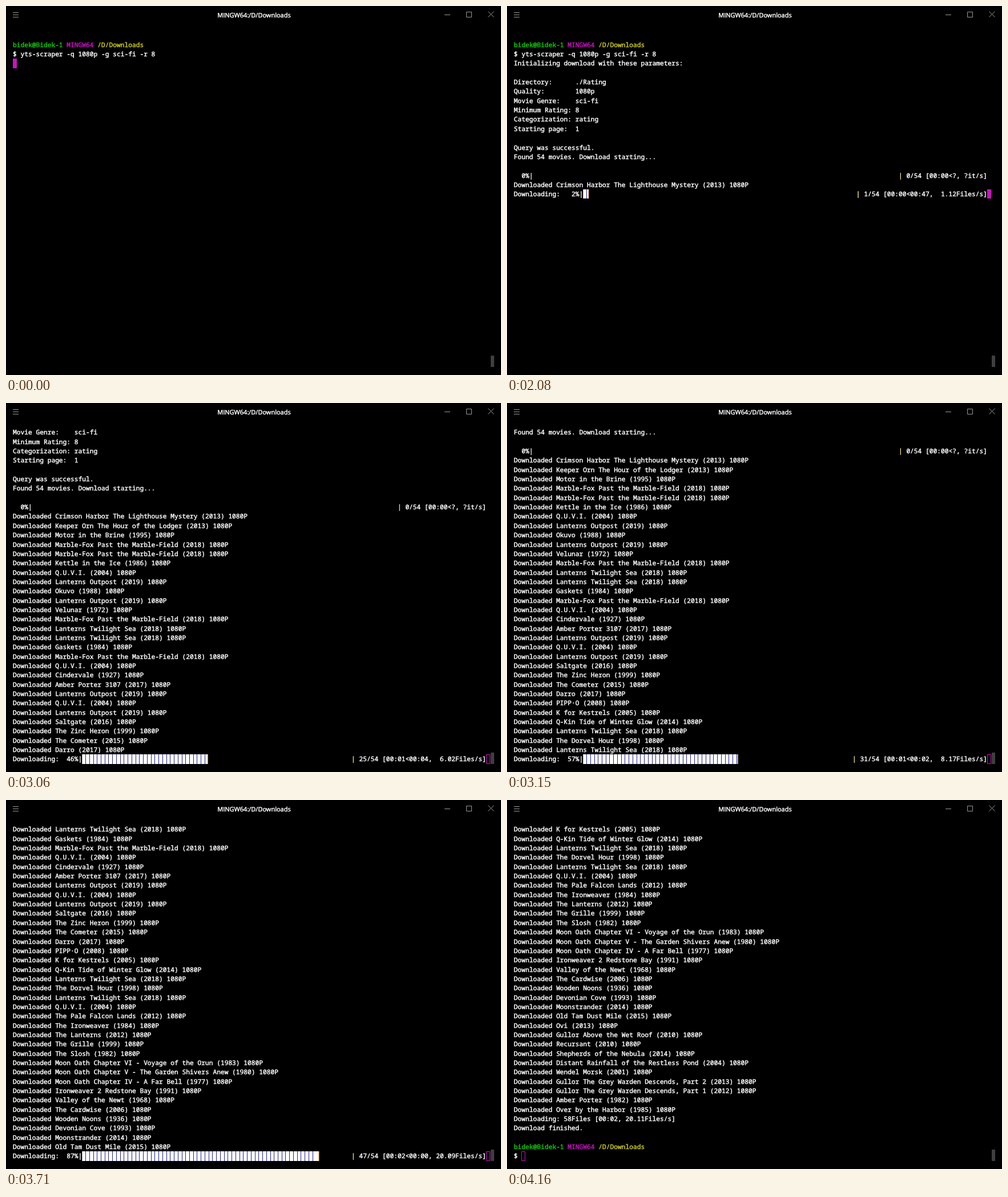
Animation, 867 px wide and 646 px high, one loop 4.81 s. Source, as an HTML page with a canvas:

```html
<!DOCTYPE html>
<html lang="en">
<head>
<meta charset="utf-8">
<title>Terminal download</title>
<style>
  html, body { margin: 0; width: 100%; height: 100%; overflow: hidden; background: #000; }
  canvas { display: block; }
</style>
</head>
<body>
<canvas id="stage" width="867" height="646"></canvas>
<script>
const ctx = document.getElementById('stage').getContext('2d', { alpha: false });
const LOOP = 4810, TOTAL = 54;
const COLS = 123, ROWS = 36, LEFT = 12, CELL_W = 6.739, CELL_H = 16.343;
const WHITE = '#fff', GREEN = '#16c60c', MAGENTA = '#c813c0', YELLOW = '#d0cf1c';
const PIPE = '#ffeb9c', SEAM = '#1d1d98', FRINGE = '#e8a840', CHROME = '#999';

const movies = `Crimson Harbor The Lighthouse Mystery (2013)
Keeper Orn The Hour of the Lodger (2013)
Motor in the Brine (1995)
Marble-Fox Past the Marble-Field (2018)
Marble-Fox Past the Marble-Field (2018)
Kettle in the Ice (1986)
Q.U.V.I. (2004)
Lanterns Outpost (2019)
Okuvo (1988)
Lanterns Outpost (2019)
Velunar (1972)
Marble-Fox Past the Marble-Field (2018)
Lanterns Twilight Sea (2018)
Lanterns Twilight Sea (2018)
Gaskets (1984)
Marble-Fox Past the Marble-Field (2018)
Q.U.V.I. (2004)
Cindervale (1927)
Amber Porter 3107 (2017)
Lanterns Outpost (2019)
Q.U.V.I. (2004)
Lanterns Outpost (2019)
Saltgate (2016)
The Zinc Heron (1999)
The Cometer (2015)
Darro (2017)
PIPP·O (2008)
K for Kestrels (2005)
Q-Kin Tide of Winter Glow (2014)
Lanterns Twilight Sea (2018)
The Dorvel Hour (1998)
Lanterns Twilight Sea (2018)
Q.U.V.I. (2004)
The Pale Falcon Lands (2012)
The Ironweaver (1984)
The Lanterns (2012)
The Grille (1999)
The Slosh (1982)
Moon Oath Chapter VI - Voyage of the Orun (1983)
Moon Oath Chapter V - The Garden Shivers Anew (1980)
Moon Oath Chapter IV - A Far Bell (1977)
Ironweaver 2 Redstone Bay (1991)
Valley of the Newt (1968)
The Cardwise (2006)
Wooden Noons (1936)
Devonian Cove (1993)
Moonstrander (2014)
Old Tam Dust Mile (2015)
Ovi (2013)
Gullor Above the Wet Roof (2010)
Recursant (2010)
Shepherds of the Nebula (2014)
Distant Rainfall of the Restless Pond (2004)
Wendel Morsk (2001)
Gullor The Grey Warden Descends, Part 2 (2013)
Gullor The Grey Warden Descends, Part 1 (2012)
Amber Porter (1982)
Over by the Harbor (1985)`.split('\n').map(title => `Downloaded ${title} 1080P`);

const prompt = [['bidek@Bidek-1 ', GREEN], ['MINGW64 ', MAGENTA], ['/D/Downloads', YELLOW]];
const command = ['', prompt, '$ yts-scraper -q 1080p -g sci-fi -r 8'];
const settings = `Initializing download with these parameters:

Directory:      ./Rating
Quality:        1080p
Movie Genre:    sci-fi
Minimum Rating: 8
Categorization: rating
Starting page:  1

Query was successful.
Found 54 movies. Download starting...
`.split('\n');

// time, lines listed, files counted, files per second
const progress = [
  [2080, 1, 1, 1.12], [2180, 4, 3, 1.36], [2230, 6, 5, 1.63], [2280, 9, 8, 2.02],
  [2560, 11, 10, 2.34], [2610, 13, 12, 2.71], [2650, 14, 13, 2.96], [2690, 16, 15, 3.42],
  [2740, 18, 17, 3.90], [2790, 20, 19, 4.36], [2820, 22, 21, 4.87],
  [3060, 26, 25, 6.02], [3100, 29, 28, 7.01], [3150, 32, 31, 8.17], [3200, 35, 34, 9.72],
  [3380, 37, 36, 10.9], [3430, 39, 38, 12.2], [3470, 41, 40, 13.7], [3510, 43, 42, 15.3],
  [3560, 45, 44, 17.1], [3710, 48, 47, 20.09], [3760, 51, 50, 20.10], [3800, 54, 53, 20.10],
  [3850, 56, 55, 20.10], [3890, 58, 58, 20.11]
];
const times = [0, 1210, 1770, ...progress.map(step => step[0]), 4070, 4160];

const clock = seconds => '00:' + String(Math.floor(seconds)).padStart(2, '0');

function meter(head, done, stats) {
  const tail = ` ${done}/${TOTAL} [${stats}]`;
  const width = COLS - head.length - tail.length - 1;
  const row = [[head + ' '.repeat(width), WHITE], ['|', PIPE], [tail, WHITE]];
  row.bar = { start: head.length, cells: width * done / TOTAL };
  return row;
}

function downloading(done, rate) {
  const speed = rate.toFixed(2).padStart(5) + 'Files/s';
  if (done > TOTAL) return `Downloading: ${done}Files [00:02, ${speed}]`;
  const percent = String(Math.round(100 * done / TOTAL)).padStart(3);
  const elapsed = done < 9 ? 0 : done < 36 ? 1 : 2;
  const stats = done ? `${clock(elapsed)}<${clock((TOTAL - done) / rate)}, ${speed}` : '00:00<?, ?Files/s';
  return meter(`Downloading: ${percent}%|`, done, stats);
}

function screenRows(time) {
  if (time < 1210) return [...command, ''];
  const rows = [...command, ...settings];
  if (time < 1770) return [...rows, downloading(0, 0)];
  rows.push(meter('  0%|', 0, '00:00<?, ?it/s'));
  if (time < 2080) return [...rows, ''];
  const [, listed, done, rate] = progress.findLast(step => step[0] <= time);
  rows.push(...movies.slice(0, listed), downloading(done, rate));
  if (time >= 4070) rows.push('Download finished.', '');
  if (time >= 4160) rows.push(prompt, '$ ');
  return rows;
}

const colX = col => LEFT + col * CELL_W;
const rowY = row => Math.round(43.3 + row * CELL_H);

function fill(color, x, y, w, h) {
  ctx.fillStyle = color;
  ctx.fillRect(x, y, w, h);
}

// A thin outline gives the text the weight of a hinted screen font.
function drawText(text, x, y, color) {
  ctx.fillStyle = ctx.strokeStyle = color;
  ctx.lineWidth = 0.45;
  ctx.fillText(text, x, y);
  ctx.strokeText(text, x, y);
}

function drawBar({ start, cells }, y, height) {
  const full = Math.floor(cells);
  const part = Math.floor(cells % 1 * 8) / 8 * 12; // fallback glyph is wider than a cell
  const x = colX(start), end = x + full * CELL_W;
  fill(WHITE, x, y, full * CELL_W + part, height);
  if (part) fill(FRINGE, end + part - 0.7, y, 1, height);
  for (let i = 1; i < full + (part > 0); i++) fill(SEAM, Math.round(x + i * CELL_W) - 1, y, 1, height);
}

// Draws one row on the character grid and returns its length in columns.
function drawRow(row, index) {
  const baseline = Math.round(51.4 + index * CELL_H) + 4;
  let col = 0;
  for (const [text, color] of typeof row === 'string' ? [[row, WHITE]] : row) {
    for (const char of text) {
      if (char !== ' ') drawText(char, colX(col), baseline, color);
      col++;
    }
  }
  if (row.bar) drawBar(row.bar, rowY(index), rowY(index + 1) - rowY(index));
  return col;
}

function drawCursor(col, row, hollow) {
  const x = Math.round(colX(col)), y = rowY(row), height = rowY(row + 1) - y;
  if (!hollow) return fill(MAGENTA, x, y, 7, height);
  ctx.strokeStyle = MAGENTA;
  ctx.lineWidth = 1;
  ctx.strokeRect(x + 0.5, y + 0.5, 6, height - 1);
}

function drawWindow() {
  fill('#000', 0, 0, 867, 646);
  for (const y of [11, 15, 19]) fill(CHROME, 12, y, 10, 1);
  fill(CHROME, 768, 15, 10, 1);
  ctx.strokeStyle = CHROME;
  ctx.lineWidth = 1;
  ctx.strokeRect(806.5, 10.5, 9, 9);
  ctx.stroke(new Path2D('M844.5 9.5l10 10m0-10l-10 10'));
  ctx.fillStyle = '#3f3f3f';
  ctx.fill(new Path2D('M850 612h4q1 0 1 1v18q0 1-1 1h-4q-1 0-1-1v-18q0-1 1-1z'));
  ctx.font = '11px "Open Sans", "Noto Sans", sans-serif';
  ctx.textAlign = 'center';
  drawText('MINGW64:/D/Downloads', 434.5, 20, WHITE);
}

function draw(time) {
  drawWindow();
  ctx.font = '11.23px "Noto Sans Mono", "DejaVu Sans Mono", monospace';
  ctx.textAlign = 'left';
  const rows = screenRows(time).slice(-ROWS);
  const lengths = rows.map(drawRow);
  drawCursor(lengths.at(-1), rows.length - 1, time >= 2560);
}

let shown;
function tick() {
  const now = performance.now() % LOOP;
  const time = times.findLast(start => start <= now);
  if (time !== shown) draw(shown = time);
  requestAnimationFrame(tick);
}
ctx.textRendering = 'geometricPrecision';
ctx.lineJoin = 'round';
tick();
</script>
</body>
</html>
```
